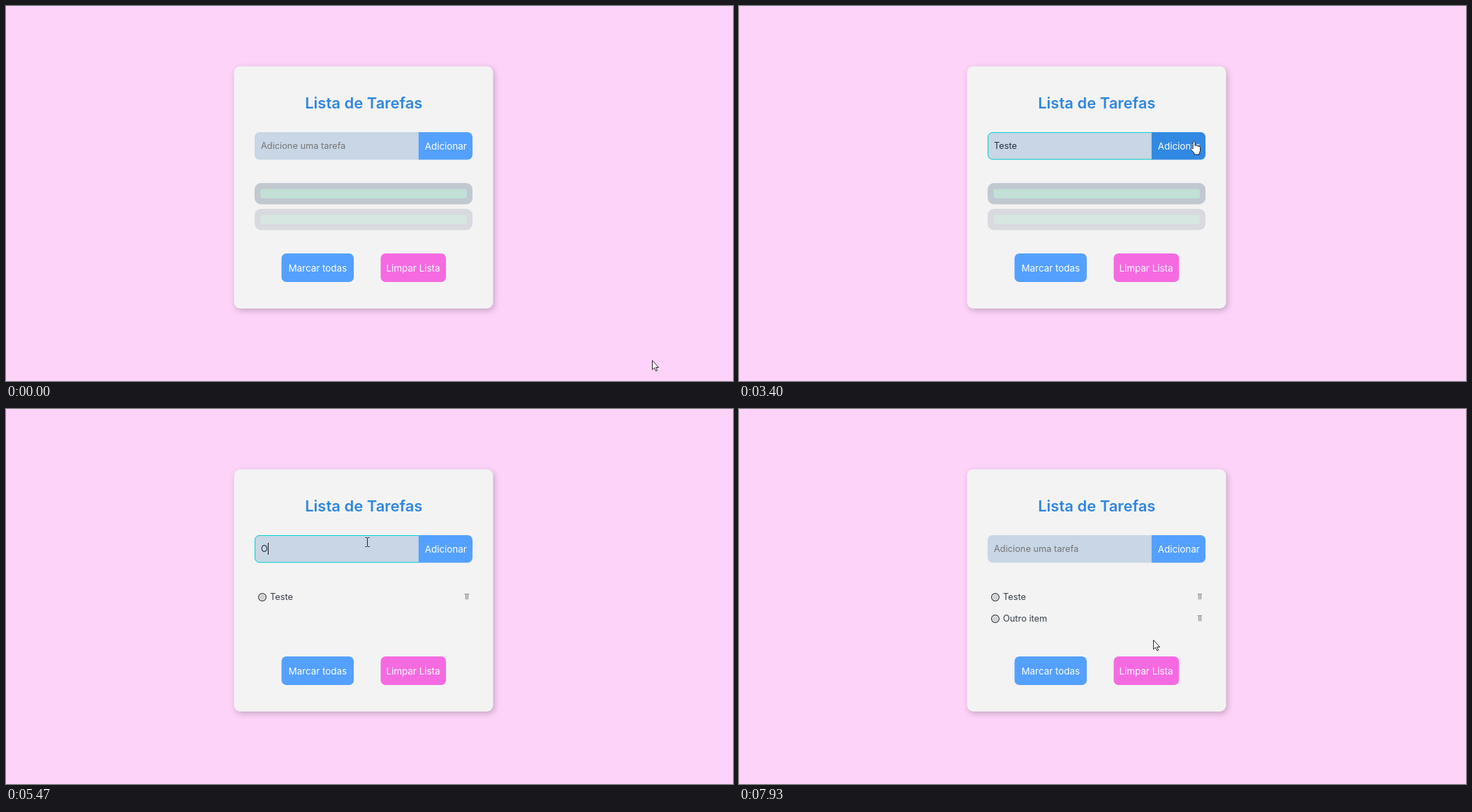
Recreate the animation shown at these times as an HTML page. Size 1041 by 538 pixels, loop 8000 ms.

```html
<!DOCTYPE html>
<html lang="pt">
<head>
<meta charset="utf-8">
<title>Lista de Tarefas</title>
<style>
  html, body { margin: 0; width: 100%; height: 100%; overflow: hidden; background: #fdd3f9; }
  svg { display: block; width: 1041px; height: 538px; }
  text { font-family: Poppins, Inter, sans-serif; font-size: 12.8px; fill: #222f3e; white-space: pre; }
  .title { font-size: 22px; font-weight: 600; fill: #2e86de; text-anchor: middle; }
  .label { font-size: 13.4px; fill: #fff; text-anchor: middle; }
  .card { filter: drop-shadow(2px 3px 4px rgba(0, 0, 0, .22)); }
  .item text { fill: #363d48; }
</style>
</head>
<body>
<svg viewBox="0 0 1041 538">
  <defs>
    <g id="controls">
      <circle cx="367" cy="270" r="5.4" fill="#f8f8f8" stroke="#30343a" stroke-width="1.2"/>
      <circle cx="367" cy="270" r="3.7" fill="#cfcfcf"/>
      <path d="M656.5 265.5h6.5" stroke="#8b9094"/>
      <path d="M657.2 266h5.4l-.5 7.5h-4.4z" fill="#c9cccd"/>
      <path d="M658.5 266.5v6.5M661.5 266.5v6.5" stroke="#8b9094" stroke-width=".8"/>
    </g>
    <g id="skeleton">
      <rect x="356" y="254" width="312" height="30.5" rx="9"/>
      <rect x="364.5" y="262.5" width="295.5" height="13.5" rx="4" style="fill:var(--bar)"/>
    </g>
  </defs>
  <rect width="1041" height="538" fill="#fdd3f9"/>
  <rect class="card" x="326.5" y="86.5" width="371" height="347.5" rx="9" fill="#f3f3f3"/>
  <text class="title" x="512.3" y="147">Lista de Tarefas</text>

  <path d="M591 181h-228a7 7 0 0 0-7 7v25.6a7 7 0 0 0 7 7h228z" fill="#c8d6e5"/>
  <path id="focus" d="M591 181.5h-228a6.5 6.5 0 0 0-6.5 6.5v25.5a6.5 6.5 0 0 0 6.5 6.5h228" fill="none" stroke="#00d2d3"/>
  <text id="hint" x="365" y="205" style="fill:#757575">Adicione uma tarefa</text>
  <text id="typed" x="365" y="205"></text>
  <path id="spelling" fill="none" stroke="#e02020" stroke-width=".9"/>
  <path id="caret" d="M.5 192v17" stroke="#111"/>
  <path id="add" d="M590.8 181h70.2a7 7 0 0 1 7 7v25.6a7 7 0 0 1-7 7h-70.2z"/>
  <text class="label" x="629.8" y="206">Adicionar</text>

  <g id="empty">
    <use href="#skeleton" fill="#c1c8d0" style="--bar:#c2e0d6"/>
    <use href="#skeleton" y="37" fill="#d8dae0" style="--bar:#d6e6e0"/>
  </g>
  <g id="first" class="item"><use href="#controls"/><text x="378" y="274">Teste</text></g>
  <g id="second" class="item" transform="translate(0 31)"><use href="#controls"/><text x="378" y="274">Outro item</text></g>

  <rect x="394.5" y="355" width="103.5" height="41" rx="7" fill="#54a0ff"/>
  <text class="label" x="446.3" y="381">Marcar todas</text>
  <rect x="536.5" y="355" width="93.5" height="41" rx="7" fill="#f56ae1"/>
  <text class="label" x="583" y="381">Limpar Lista</text>

  <g id="cursor">
    <path id="arrow" d="M.5.5V13.8l3-2.7 2.2 4.7 1.9-.9-2.1-4.4h4z" fill="#fff" stroke="#111" stroke-width=".9"/>
    <path id="beam" d="M-2.5-6.5h2l1 .8 1-.8h2M.5-6V6M-2.5 6.5h2l1-.8 1 .8h2" fill="none" stroke="#222"/>
    <path id="hand" d="M-1 11V1.5q1.5-2.6 3 0V6.5q1.6-1.5 2.8.4 1.6-1 2.6.6 1.8-.4 2.1 1.3V13q0 2-1.4 3.6V19H.5v-2.4L-4.1 11.5q-.3-2 1.6-1.6z" fill="#fff" stroke="#111" stroke-width=".9"/>
  </g>
</svg>
<script>
const LOOP = 8, FPS = 15, BLINK = .53, FADE = .3;
const $ = id => document.getElementById(id);
const show = (id, on) => $(id).style.display = on ? '' : 'none';
const clamp = v => Math.min(1, Math.max(0, v));
const easeOut = v => 1 - (1 - clamp(v)) ** 2;

// All times are in seconds
const home = { x: 925, y: 508 };
const moves = [
  { at: 0, lasts: .4, x: 366, y: 202 },
  { at: .4, lasts: .13, x: 432, y: 201 },
  { at: 2.93, lasts: .4, x: 662, y: 200 },
  { at: 3.33, lasts: .33, x: 632, y: 184 },
  { at: 4.07, lasts: .26, x: 517, y: 191 },
  { at: 6.87, lasts: .4, x: 635, y: 205 },
  { at: 7.53, lasts: .4, x: 593, y: 331 }
];

// The first letter comes alone, the others follow at a steady pace
const sessions = [
  { text: 'Teste', focus: .73, first: 1.93, next: 2.2, last: 2.6, blur: 3.66, submit: 3.86, enter: 3.2, leave: 4.2 },
  { text: 'Outro item', focus: 4.4, first: 5.46, next: 5.66, last: 6.4, blur: 7.33, submit: 7.46, enter: 7.06, leave: 7.6 }
];

function keyTime(s, i) {
  return i ? s.next + (s.last - s.next) * (i - 1) / (s.text.length - 2) : s.first;
}

function drawField(t) {
  const s = sessions.find(s => t < s.submit) || sessions[1];
  let count = 0, lastInput = s.focus;
  while (t < s.submit && count < s.text.length && keyTime(s, count) <= t) lastInput = keyTime(s, count++);
  const focused = t >= s.focus && t < s.blur;

  $('typed').textContent = s.text.slice(0, count);
  show('hint', !count);
  show('focus', focused);
  show('caret', focused && Math.floor((t - lastInput) / BLINK) % 2 === 0);
  const width = count ? $('typed').getComputedTextLength() : 0;
  $('caret').setAttribute('transform', `translate(${365 + Math.round(width)} 0)`);

  const misspelt = count > 6;
  show('spelling', misspelt);
  if (misspelt) {
    const waves = Math.round($('typed').getSubStringLength(0, 5) / 3);
    $('spelling').setAttribute('d', 'M365 207.5' + 'l1.5-1.5 1.5 1.5'.repeat(waves));
  }
}

function drawPointer(t) {
  let { x, y } = home;
  for (const m of moves) {
    const k = easeOut((t - m.at) / m.lasts);
    x += (m.x - x) * k;
    y += (m.y - y) * k;
  }
  const inRow = y >= 181 && y <= 221 && x >= 356 && x <= 668;
  const shape = !inRow ? 'arrow' : x < 591 ? 'beam' : 'hand';
  for (const id of ['arrow', 'beam', 'hand']) show(id, id === shape);
  $('cursor').setAttribute('transform', `translate(${Math.round(x)} ${Math.round(y)})`);
}

function drawButton(t) {
  const k = Math.max(...sessions.map(s =>
    easeOut((t - s.enter) / FADE) * (1 - easeOut((t - s.leave) / FADE))));
  const mix = (a, b) => Math.round(a + (b - a) * k);
  $('add').setAttribute('fill', `rgb(${mix(84, 46)},${mix(160, 134)},${mix(255, 222)})`);
}

function frame() {
  const time = performance.now() / 1000 % LOOP;
  const t = Math.floor((time + .005) * FPS) / FPS;
  drawField(t);
  drawButton(t);
  drawPointer(t);
  show('empty', t < sessions[0].submit);
  show('first', t >= sessions[0].submit);
  show('second', t >= sessions[1].submit);
  requestAnimationFrame(frame);
}
frame();
</script>
</body>
</html>
```
